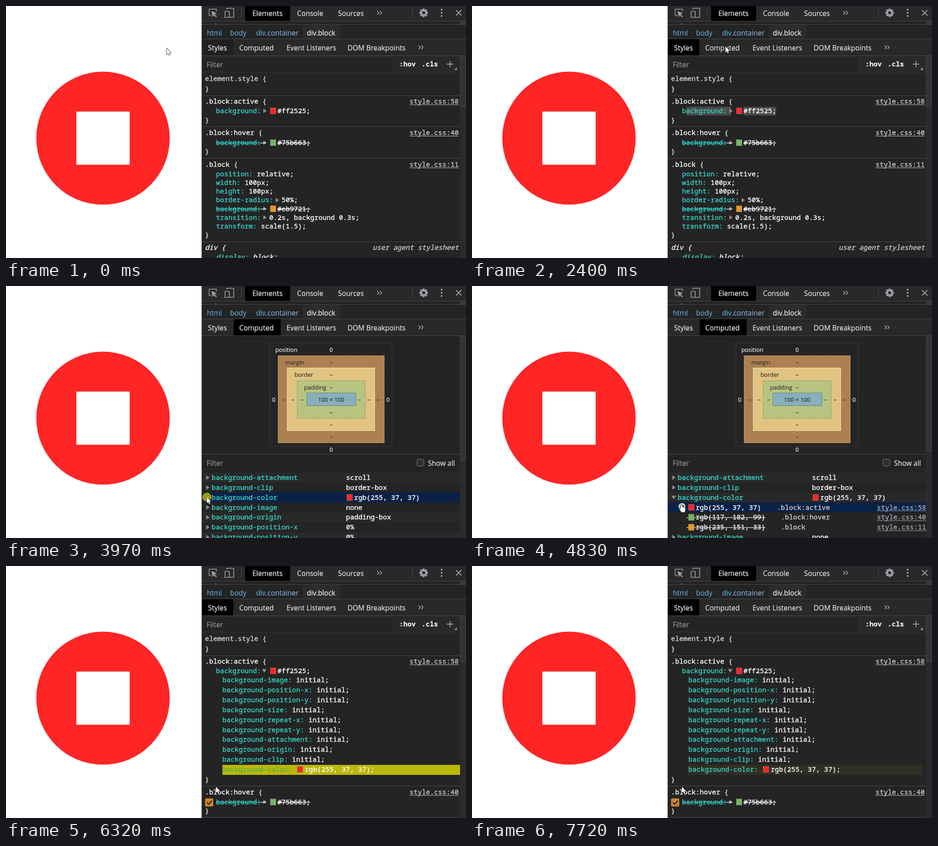
These frames come from a looping animation (1010x555 px, 7.79 s). An HTML page with a canvas:

```html
<!DOCTYPE html>
<html lang="en">
<head>
<meta charset="utf-8">
<title>Tracing a computed style</title>
<style>
  html, body { margin: 0; width: 100%; height: 100%; overflow: hidden; background: #fff; }
  canvas { display: block; }
</style>
</head>
<body>
<canvas id="stage" width="1010" height="555"></canvas>
<script>
const g = document.getElementById('stage').getContext('2d');
const LOOP = 7790, CHAR = 9;
const CYAN = '#35d4c7', WHITE = '#fff', GREY = '#9aa0a6', LINE = '#4a4a4a', PANEL = '#242424',
  BAR = '#292929', RED = '#ff2525', GREEN = '#75b663', ORANGE = '#eb9721', HOVER = '#0a2248';

// Moments of the clicks and what they cause
const T = { tabDark: 600, press: 900, release: 1680, tabDown: 2640, computed: 2710, tabUp: 2790,
  expandDown: 3820, expand: 3980, hand: 4750, jumpDown: 6120, jump: 6260 };

// Pointer path: time, x, y
const PATH = [[250, 353, 93], [650, 420, 188], [900, 470, 229], [1050, 510, 228], [1280, 610, 228],
  [1510, 657, 228], [1780, 657, 228], [2350, 558, 86], [2550, 552, 97], [2950, 552, 97],
  [3260, 513, 241], [3740, 441, 465], [4620, 441, 465], [4830, 460, 480], [5100, 464, 510],
  [5400, 462, 517], [5490, 462, 525], [5700, 465, 491], [5940, 461, 486]];

const clamp = v => Math.max(0, Math.min(1, v));
const mix = (a, b, k) => `rgb(${a.map((v, i) => v + (b[i] - v) * k).map(Math.round)})`;

function pointerAt(t) {
  const i = PATH.findIndex(p => p[0] > t);
  if (i === 0) return PATH[0].slice(1);
  if (i < 0) return PATH[PATH.length - 1].slice(1);
  const [t0, x0, y0] = PATH[i - 1], [t1, x1, y1] = PATH[i], k = (t - t0) / (t1 - t0);
  return [x0 + (x1 - x0) * k, y0 + (y1 - y0) * k];
}

function rect(x, y, w, h, color) {
  g.fillStyle = color;
  g.fillRect(x, y, w, h);
}

function frame(x, y, w, h, color, dash = []) {
  g.strokeStyle = color;
  g.lineWidth = 1;
  g.setLineDash(dash);
  g.strokeRect(x + .5, y + .5, w - 1, h - 1);
  g.setLineDash([]);
}

function disc(x, y, r, color) {
  g.fillStyle = color;
  g.beginPath();
  g.arc(x, y, r, 0, 7);
  g.fill();
}

function stroke(d, color, width = 1.5) {
  g.strokeStyle = color;
  g.lineWidth = width;
  g.stroke(new Path2D(d));
}

function fill(d, color) {
  g.fillStyle = color;
  g.fill(new Path2D(d));
}

// A hairline outline (weight) thickens the strokes of the letters
function text(x, y, s, color, font, weight, align = 'left') {
  g.font = font;
  g.fillStyle = g.strokeStyle = color;
  g.lineWidth = weight;
  g.textAlign = align;
  g.fillText(s, x, y);
  g.strokeText(s, x, y);
}

const mono = (x, y, s, color = WHITE, style = '') =>
  text(x, y, s, color, `${style} 15px "Noto Sans Mono", monospace`, .4);
const ui = (x, y, s, color = '#f0f0f0', size = 15.4, align) =>
  text(x, y, s, color, `${size}px "Open Sans", sans-serif`, .15, align);

function link(right, y, s, color = '#c8c8c8') {
  const x = right - s.length * CHAR;
  mono(x, y, s, color);
  rect(x, y + 2, right - x, 1, color);
}

function swatch(x, y, color) {
  rect(x, y - 12, 13, 14, color);
  frame(x, y - 12, 13, 14, 'rgba(128,128,128,.6)');
}

const triRight = (x, y) => fill(`M${x} ${y - 5}l7.5 5-7.5 5z`, '#8c8c8c');
const triDown = (x, y) => fill(`M${x} ${y - 4}h10l-5 8z`, '#8c8c8c');
const divider = y => rect(431, y, 566, 1, LINE);
const chevrons = (x, y) => stroke(`M${x} ${y - 4}l4 4-4 4m6-8l4 4-4 4`, '#b0b4b8');

function thumb(top, height) {
  rect(997, top, 13, height, '#333');
  frame(997, top, 13, height, '#484848');
}

function scrollbar(height) {
  rect(997, 110, 13, 445, '#2b2b2b');
  thumb(110, height);
}

function checkbox(y) {
  g.fillStyle = '#c8842f';
  g.beginPath();
  g.roundRect(437, y - 13, 18, 18, 3);
  g.fill();
  stroke(`M441 ${y - 4}l4 4 7-8`, '#1e1e1e', 2.2);
}

// A declaration line; options: arrow, color swatch, struck out, open
function decl(y, name, value, o = {}) {
  const x = 461 + (name.length + 1) * CHAR;
  mono(461, y, name + ':', CYAN);
  if (o.open) triDown(x + 2, y - 5);
  else if (o.arrow) triRight(x + 5, y - 5);
  if (o.color) swatch(x + 20, y, o.color);
  const start = x + (o.color ? 36 : o.arrow ? 18 : CHAR);
  mono(start, y, value);
  if (o.struck) {
    rect(461, y - 5, x - 461, 1.4, CYAN);
    rect(x, y - 5, 11, 1.4, WHITE);
    rect(start, y - 5, value.length * CHAR, 1.4, WHITE);
  }
}

function selector(y, name, from) {
  mono(437, y, name);
  mono(437 + (name.length + 1) * CHAR, y, '{', '#ddd');
  link(994, y, from);
}
const brace = y => mono(437, y, '}', '#ddd');

function page() {
  rect(0, 0, 430, 555, '#fff');
  disc(213, 291.1, 146.5, RED);
  rect(154.5, 232.5, 117, 117, '#fff');
}

function topBar() {
  rect(429.5, 0, 580.5, 555, PANEL);
  rect(430, 0, 580, 33, BAR);
  rect(430, 33, 580, 1, LINE);
  stroke('M451 21h-5v-14h16v5', GREY);
  fill('M451 11l12 5-5 2 5 5-2 2-5-5-2 5z', GREY);
  stroke('M485 8v-3h15v20h-9M481 12h9v13h-9z', GREY, 1.7);
  rect(516, 5, 1, 20, LINE);
  rect(525, 0, 99, 33, '#000');
  ui(541, 22, 'Elements', '#fff');
  ui(639, 22, 'Console');
  ui(729, 22, 'Sources');
  chevrons(815, 15);
  rect(892, 5, 1, 20, LINE);
  for (let i = 0; i < 4; i++) {
    g.save();
    g.translate(917, 15);
    g.rotate(i * Math.PI / 4);
    rect(-2.2, -9.5, 4.4, 19, GREY);
    g.restore();
  }
  disc(917, 15, 7.2, GREY);
  disc(917, 15, 3.3, BAR);
  for (const y of [8, 15, 22]) disc(956.5, y, 2, GREY);
  stroke('M988 9l12 12m0-12l-12 12', GREY, 1.8);
  thumb(34, 6);
  rect(457, 39, 6, 1, '#777');
  rect(430, 40, 580, 1, LINE);
  rect(652, 42, 82, 30, '#2c2c2c');
  ui(441, 65, 'html', '#5db0d7');
  ui(492, 65, 'body', '#5db0d7');
  ui(549, 65, 'div', '#5db0d7');
  ui(570, 65, '.container', '#84b5e0');
  ui(660.5, 65, 'div.block', '#fff');
  rect(430, 72, 580, 1, LINE);
}

function tabs(t, computed) {
  rect(430, 73, 580, 36, BAR);
  if (computed) rect(500, 73, 103, 36, '#000');
  else rect(431, 73, 68, 36, t < T.tabDark ? '#202020' : '#000');
  ui(443.5, 98, 'Styles', computed ? undefined : '#fff');
  ui(512, 98, 'Computed', computed ? '#fff' : undefined);
  ui(616, 98, 'Event Listeners');
  ui(750, 98, 'DOM Breakpoints');
  chevrons(906, 91);
  rect(430, 109, 580, 1, LINE);
}

function selection(px) {
  const tone = '#4a4a4a';
  rect(470, 222, Math.max(0, Math.min(px, 569) - 470), 19, tone);
  const chars = Math.min(8, Math.floor((px - 596) / CHAR));
  if (chars > 0) rect(596, 222, chars * CHAR, 19, tone);
}

function longhands(t) {
  const names = ['image', 'position-x', 'position-y', 'size', 'repeat-x', 'repeat-y', 'attachment', 'origin', 'clip'];
  names.forEach((name, i) => {
    const y = 256 + i * 21.9, label = `background-${name}:`;
    mono(475, y, label, CYAN);
    mono(475 + (label.length + 1) * CHAR, y, 'initial;');
  });
  const k = clamp((t - 6320) / 700);
  rect(475, 438, k < 1 ? 522 : 514, 22, mix([186, 184, 10], [47, 47, 34], k));
  mono(475, 453, 'background-color:', mix([90, 172, 72], [53, 212, 199], clamp((t - 6320) / 1400)));
  swatch(639, 453, RED);
  mono(656, 453, 'rgb(255, 37, 37);');
}

function stylesPane(t, px, py) {
  const open = t >= T.jump, shift = open ? 218.7 : 0;
  rect(430, 110, 567, 36, BAR);
  rect(433, 113, 416, 30, PANEL);
  ui(440.5, 135, 'Filter', '#9a9a9a');
  mono(863.5, 133, ':hov', '#e8e8e8', 'bold');
  mono(912.5, 133, '.cls', '#e8e8e8', 'bold');
  stroke('M968 128h14m-7-7v14', GREY, 1.8);
  fill('M990 135v6h-6z', GREY);
  rect(430, 146, 567, 1, '#303030');
  mono(437, 165, 'element.style {', '#d5d5d5');
  brace(187);

  divider(197);
  if (!open && t > T.press) selection(t < 1510 ? px : 668);
  selector(215, '.block:active', 'style.css:58');
  decl(236, 'background', '#ff2525;', { arrow: true, color: RED, open });
  if (!open && px > 431 && py > 197 && py < 265) checkbox(236);
  if (open) longhands(t);
  brace(256 + shift);

  divider(Math.round(265 + shift));
  selector(284 + shift, '.block:hover', 'style.css:40');
  decl(306 + shift, 'background', '#75b663;', { arrow: true, color: GREEN, struck: true });
  if (open) checkbox(306 + shift);
  brace(325 + shift);

  divider(Math.round(334.5 + shift));
  if (!open) {
    selector(354, '.block', 'style.css:11');
    const body = [['position', 'relative;'], ['width', '100px;'], ['height', '100px;'],
      ['border-radius', '50%;', { arrow: true }],
      ['background', '#eb9721;', { arrow: true, color: ORANGE, struck: true }],
      ['transition', '0.2s, background 0.3s;', { arrow: true }], ['transform', 'scale(1.5);']];
    body.forEach(([name, value, o], i) => decl(375 + i * 19.15, name, value, o));
    brace(509);
    divider(519);
    mono(437, 537, 'div {', WHITE, 'italic');
    mono(805, 537, 'user agent stylesheet', '#c8c8c8', 'italic');
    mono(461, 558, 'display:', CYAN, 'italic');
    mono(542, 558, 'block;', WHITE, 'italic');
  }
  scrollbar(open ? 101 : 112);
}

function boxModel() {
  const small = (x, y, s, color = '#2c2c2c', align) => ui(x, y, s, color, 12.8, align);
  frame(579, 125, 269, 229, '#505050', [1, 1]);
  rect(597, 153, 234, 193, '#ad8050');
  frame(597, 153, 234, 193, '#c9b08f', [3, 2]);
  rect(617, 180, 193, 139, '#e2c380');
  frame(617, 180, 193, 139, '#f0e6cc');
  rect(639, 208, 150, 84, '#b7c47f');
  frame(639, 208, 150, 84, '#7f8762', [3, 2]);
  rect(660, 235, 109, 29, '#87b0bb');
  frame(660, 235, 109, 29, '#707c80');
  small(591.5, 145, 'position', '#fff');
  small(613, 173, 'margin');
  small(633.5, 200, 'border');
  small(654.5, 228, 'padding');
  small(714, 255, '100 × 100', '#2c2c2c', 'center');
  for (const [x, y] of [[714, 145], [588, 255], [839, 255], [714, 365]]) small(x, y, '0', '#fff', 'center');
  for (let i = 0; i < 3; i++) {
    const off = i * 21, down = i * 27.3;
    for (const [x, y] of [[714, 169 + down], [714, 278.5 + down], [609 + off, 250.5], [776 + off, 250.5]])
      rect(x - 3, Math.round(y) - .5, 6, 1.2, '#333');
  }
}

function trace(i, py, color, value, name, from) {
  const top = 476.5 + i * 21.9, y = top + 16, over = py >= top && py < top + 21.9;
  const end = 491 + value.length * CHAR;
  if (over) {
    rect(431, top, 566, 21.9, HOVER);
    disc(461, y - 7, 7.5, '#d0d0d0');
    stroke(`M457 ${y - 7}h7m-3-3.5l3.5 3.5-3.5 3.5`, '#222', 2);
  }
  mono(491, y, value);
  if (i) rect(471, y - 5, end - 471, 1.4, '#d8d8d8');
  swatch(475, y, color);
  mono(end + 34, y, name, '#d0d0d0');
  link(997, y, from, '#a4a8ad');
}

function computedPane(t, px, py) {
  const open = t >= T.expand;
  boxModel();
  divider(370);
  ui(440.5, 395.5, 'Filter', '#9a9a9a');
  if (t < T.expandDown) {
    frame(434, 374, 455, 30, '#12618f');
    rect(440, 379, 1, 20, '#fff');
  }
  g.fillStyle = '#303030';
  g.strokeStyle = '#808080';
  g.lineWidth = 1;
  g.beginPath();
  g.roundRect(902.5, 381.5, 15, 15, 3);
  g.fill();
  g.stroke();
  ui(926.5, 395.5, 'Show all', '#f0f0f0');

  const rows = [['attachment', 'scroll'], ['clip', 'border-box'], ['color', 'rgb(255, 37, 37)'], ['image', 'none'],
    ['origin', 'padding-box'], ['position-x', '0%'], ['position-y', '0%']];
  rows.forEach(([name, value], i) => {
    const top = 411 + (i + (open && i > 2 ? 3 : 0)) * 21.85, y = top + 16, isColor = name === 'color';
    if (px > 431 && py >= top && py < top + 21.85) rect(431, top, 566, 21.85, HOVER);
    else if (i % 2 === 0) rect(431, top, 566, 21.85, BAR);
    if (open && isColor) triDown(438, y - 5);
    else triRight(439.5, y - 5);
    mono(451.5, y, 'background-' + name, CYAN);
    if (isColor) swatch(748, y, RED);
    mono(isColor ? 764.5 : 746.5, y, value);
  });
  if (open) {
    trace(0, py, RED, 'rgb(255, 37, 37)', '.block:active', 'style.css:58');
    trace(1, py, GREEN, 'rgb(117, 182, 99)', '.block:hover', 'style.css:40');
    trace(2, py, ORANGE, 'rgb(235, 151, 33)', '.block', 'style.css:11');
  }
  scrollbar(open ? 254 : 275);
}

function pointer(t, x, y) {
  const within = (a, b) => t >= a && t < b;
  if (within(T.press, T.release) || within(T.tabDown, T.tabUp) || within(T.expandDown, T.expand) || within(T.jumpDown, T.jump))
    disc(x, y, 10, 'rgba(205,195,0,.75)');
  g.save();
  g.translate(x, y);
  g.lineJoin = 'round';
  let shape = 'M0 0v13.5l3-2.8 2 4.6 2.2-1-2-4.4h4z';
  if (within(T.hand, T.jump))
    shape = 'M-1.5 1.5q1.5-2 3 0v5l5 1.2q2 .6 2 2.5v3l-1.5 5h-7l-4.5-6.5q-.5-2 1.5-1.6l1.5 1.4z';
  if (within(850, 1900)) stroke('M-2.5-5h5m-2.5 0v11m-2.5 0h5', '#d8d8d8', 1);
  else {
    stroke(shape, '#111', 1.4);
    fill(shape, '#fff');
  }
  g.restore();
}

function draw(t) {
  const [x, y] = pointerAt(t), computed = t >= T.computed && t < T.jump;
  page();
  topBar();
  tabs(t, computed);
  (computed ? computedPane : stylesPane)(t, x, y);
  pointer(t, x, y);
}

g.lineJoin = 'round';
const began = performance.now();
function tick() {
  draw((performance.now() - began) % LOOP);
  requestAnimationFrame(tick);
}
tick();
</script>
</body>
</html>
```
